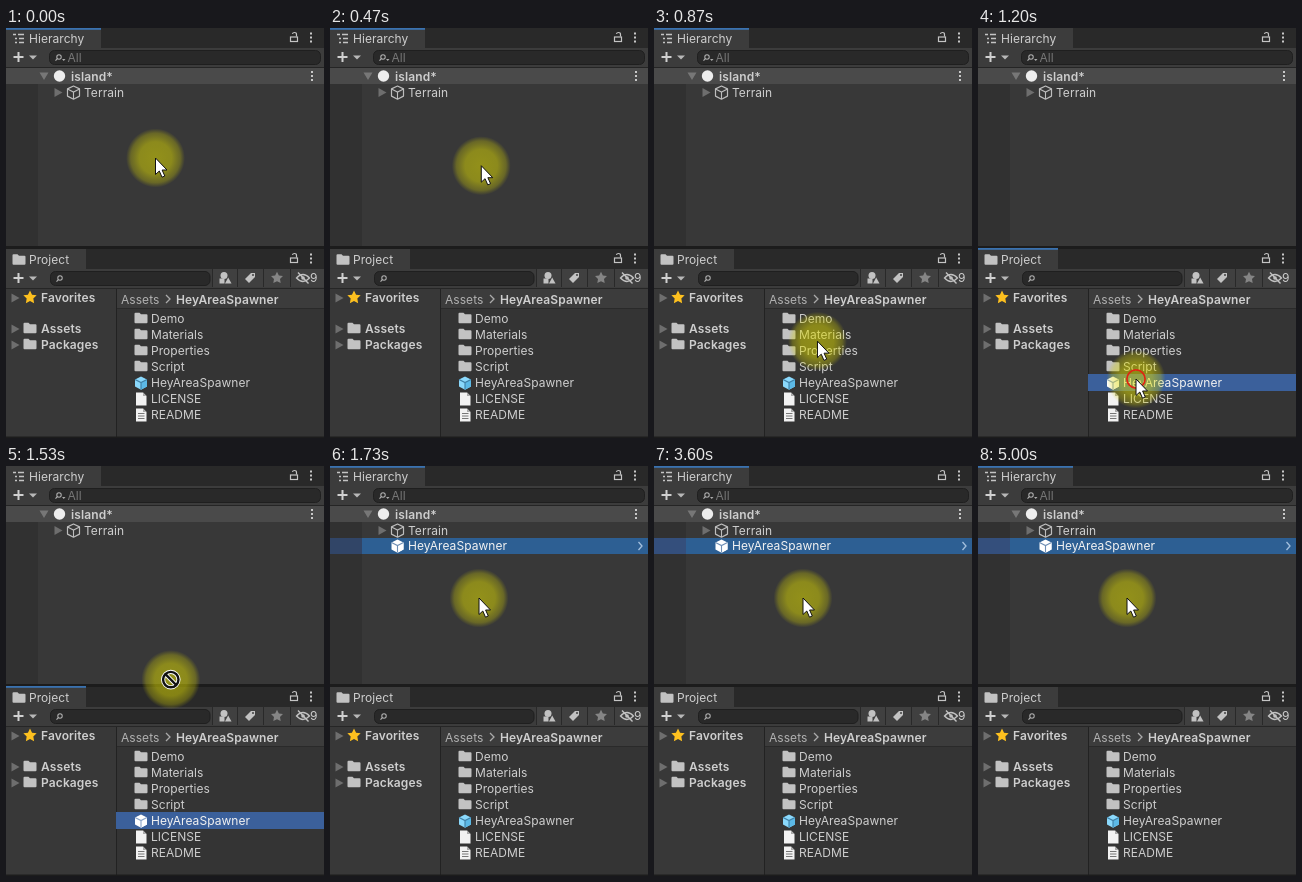
Animation of 318x410 px, one loop 5.07 s. Source, as an HTML page:

```html
<!DOCTYPE html>
<html lang="en">
<head>
<meta charset="utf-8">
<title>Editor panels</title>
<style>
html, body { margin: 0; width: 100%; height: 100%; overflow: hidden; background: #383838; }
svg { display: block; width: 318px; height: 410px; }
text { font: 12px Inter, "Liberation Sans", sans-serif; letter-spacing: .05px; fill: #cecece; }
.b { font-weight: 600; letter-spacing: .12px; }
</style>
</head>
<body>
<svg id="stage" viewBox="0 0 318 410">
  <defs>
    <radialGradient id="halo">
      <stop offset="0" stop-color="#e0dc00" stop-opacity=".54"/>
      <stop offset=".55" stop-color="#e0dc00" stop-opacity=".5"/>
      <stop offset=".84" stop-color="#d4d000" stop-opacity=".31"/>
      <stop offset="1" stop-color="#c8c400" stop-opacity="0"/>
    </radialGradient>
  </defs>
  <g id="ui"></g>
  <g id="pointer">
    <circle r="29.5" fill="url(#halo)"/>
    <circle id="ring" r="9" fill="none" stroke="#e02412" stroke-width="1.7"/>
    <path id="arrow" d="M0 0V16.5L3.8 13L6.5 19.2L9.3 18L6.6 12H11.5Z" fill="#fff" stroke="#111" stroke-width="1"/>
    <path id="resize" d="M0 -11L4.5 -6H1.5V6H4.5L0 11L-4.5 6H-1.5V-6H-4.5Z" fill="#fff" stroke="#111"/>
    <g id="deny" fill="none">
      <circle r="7.7" stroke="#fff" stroke-width="4.2"/>
      <path d="M-5.4 -5.4L5.4 5.4" stroke="#fff" stroke-width="4.2"/>
      <circle r="7.7" stroke="#111" stroke-width="2.4"/>
      <path d="M-5.4 -5.4L5.4 5.4" stroke="#111" stroke-width="2.4"/>
    </g>
  </g>
</svg>
<script>
const LOOP = 5070, STEP = 1000 / 15;
const PRESS = 1070, DRAG = 1350, DROP = 1730;
const $ = id => document.getElementById(id);

const rect = (x, y, w, h, fill, extra = "") =>
  `<rect x="${x}" y="${y}" width="${w}" height="${h}" fill="${fill}" ${extra}/>`;
const text = (x, y, s, extra = "") => `<text x="${x}" y="${y}" ${extra}>${s}</text>`;
const path = (d, fill, extra = "") => `<path d="${d}" fill="${fill}" ${extra}/>`;
const line = (d, color, w = 1, extra = "") =>
  path(d, "none", `stroke="${color}" stroke-width="${w}" ${extra}`);
const at = (x, y, s) => `<g transform="translate(${x} ${y})">${s}</g>`;
const bold = 'class="b"';

const star = (x, y, r, fill) => {
  let d = "";
  for (let i = 0; i < 10; i++) {
    const a = i * Math.PI / 5, q = i % 2 ? r * .5 : r;
    d += `${i ? "L" : "M"}${(x + q * Math.sin(a)).toFixed(2)} ${(y - q * Math.cos(a)).toFixed(2)}`;
  }
  return path(d + "Z", fill);
};
const folder = (x, y) => at(x, y,
  path("M-6.5 -4.3Q-6.5 -5.3 -5.5 -5.3H-1.5L0 -3.8H5.5Q6.5 -3.8 6.5 -2.8V4.3Q6.5 5.3 5.5 5.3H-5.5Q-6.5 5.3 -6.5 4.3Z", "#c2c2c2"));
const closed = (x, y) => path(`M${x - 3.5} ${y - 4.5}L${x + 4.5} ${y}L${x - 3.5} ${y + 4.5}Z`, "#6e6e6e");
const opened = (x, y) => path(`M${x - 4.5} ${y - 3.5}H${x + 4.5}L${x} ${y + 4}Z`, "#777");
const kebab = (x, y) => [-4, 0, 4].map(d => rect(x - 1, y + d - 1, 2, 2, "#c8c8c8")).join("");
const lock = (x, y) => at(x, y,
  rect(-3.5, -.5, 7, 4.5, "none", 'stroke="#c4c4c4" stroke-width="1.2"') +
  line("M2.5 -1V-3Q2.5 -5 .5 -5Q-1.2 -5 -1.6 -3.6", "#c4c4c4", 1.2));
const cube = (x, y, fill, edge, side = fill) => at(x, y,
  path("M0 -6.5L6 -3.6V3.6L0 6.7L-6 3.6V-3.6Z", fill) + path("M0 -.4L6 -3.4V3.6L0 6.7Z", side) +
  (fill === "none" ? line("M0 -6.5L6 -3.6V3.6L0 6.7L-6 3.6V-3.6Z", edge, 1.2, 'stroke-linejoin="round"') : "") +
  line("M-6 -3.4L0 -.4L6 -3.4M0 -.4V6.5", edge, 1.1));
const page = (x, y, lines) => at(x, y,
  path("M-5 -6.5H2L5.5 -3V6.5H-5Z", "#f2f2f2") + path("M2 -6.5V-3H5.5Z", "#aaa") +
  (lines ? line("M-3 -1.5H3.5M-3 1H3.5M-3 3.5H3.5", "#777") : ""));
const search = (x, y, w) =>
  rect(x, y, w, 14, "#292929", 'rx="5" stroke="#1f1f1f"') +
  at(x + 9.5, y + 7, '<circle cx="0" cy="-.5" r="2.2" fill="none" stroke="#b0b0b0" stroke-width="1.1"/>' +
    line("M-1.6 1.2L-3.5 3.2", "#b0b0b0", 1.2));
const addMenu = y => line(`M7.5 ${y}H17.5M12.5 ${y - 5}V${y + 5}`, "#d0d0d0", 2) +
  path(`M23 ${y - 1.5}H31L27 ${y + 2.5}Z`, "#b8b8b8");
const header = (y, id, label, tabWidth, icon) =>
  rect(0, y, 318, 20, "#292929") + rect(0, y, tabWidth, 20, "#3c3c3c") +
  rect(0, Math.max(0, y - 1), tabWidth, 1.8, "#3a72b0", `id="${id}"`) +
  icon + text(23, y + 15, label) + lock(288, y + 9.5) + kebab(305, y + 9.5) +
  rect(0, y + 20, 318, 19, "#3c3c3c") + addMenu(y + 29);

function hierarchy() {
  const tree = line("M7 6.5H10M12 6.5H18M9 10.5H11M13 10.5H18M9 14.5H11M13 14.5H18", "#c4c4c4", 1.4);
  return header(0, "focusTop", "Hierarchy", 95, tree) +
    search(43.5, 22.5, 271) + path("M56 31H59.5L57.7 33Z", "#aaa") +
    text(61.5, 34, "All", 'style="fill:#777"') +
    rect(0, 39, 318, 1, "#252525") + rect(0, 40, 32, 178, "#313131") +
    rect(0, 40, 318, 16, "#4a4a4a") + opened(38, 48) +
    '<circle cx="53.5" cy="48" r="5.7" fill="#ededed"/>' +
    text(65, 52.5, "island*", bold) + kebab(306, 48) +
    closed(52, 64.5) + cube(67.5, 64.5, "none", "#bdbdbd") + text(78, 69, "Terrain") +
    `<g id="spawned">${rect(0, 72, 32, 16, "#344f7c", 'id="gutter"')}${rect(32, 72, 286, 16, "#2d5f93")}` +
    cube(67.5, 80, "#fff", "#6f8fb5") + text(78, 84, "HeyAreaSpawner", 'style="fill:#f2f2f2"') +
    line("M308.5 76L312 80L308.5 84", "#a3bfdd", 1.3) + "</g>";
}

function toolbarIcons() {
  const grey = "#c2c2c2";
  return rect(207, 241, 111, 18, "#404040") +
    line("M206.5 241V259M231.5 241V259M257.5 241V259M284.5 241V259", "#292929") +
    at(219, 250, '<circle cx="-1" cy="-2.5" r="3.5" fill="#c2c2c2"/>' +
      path("M0 5.5L3.2 -.5L6.5 5.5Z", grey) + rect(-5.5, .5, 5, 5, grey)) +
    at(244, 250, path("M-5 1L1 -5H5V-1L-1 5Z", grey) + '<circle cx="3" cy="-3" r="1" fill="#404040"/>') +
    star(271, 250, 6.3, "#858585") +
    at(297, 250, line("M-6.5 0Q0 -7 6.5 0Q0 7 -6.5 0Z", grey, 1.3) +
      '<circle r="1.8" fill="#c2c2c2"/>' + line("M-5 -5.5L5.5 5.5", grey, 1.4)) +
    text(304, 254, "9");
}

function project() {
  const files = ["Demo", "Materials", "Properties", "Script", "HeyAreaSpawner", "LICENSE", "README"];
  const rows = files.map((name, i) => {
    const y = 291 + 16 * i;
    const icon = i < 4 ? folder(135, y - 1) : i > 4 ? page(135, y, i === 6)
      : `<g id="blueCube">${cube(135, y, "#8ad8fb", "#3f7fa5", "#5cb9e6")}</g><g id="whiteCube">${cube(135, y, "#fff", "#8ba4c8")}</g>`;
    return icon + text(145, y + 4, name, i === 4 ? 'id="asset"' : "");
  }).join("");
  return rect(0, 218, 318, 3, "#1c1c1c") +
    header(221, "focusLow", "Project", 80, at(13, 231.5, folder(0, 0))) +
    search(44.5, 243.5, 159.5) + toolbarIcons() +
    rect(0, 260, 318, 1, "#262626") + rect(0, 261, 110, 148, "#383838") +
    rect(111, 261, 207, 148, "#343434") + rect(111, 261, 207, 19, "#3c3c3c") +
    rect(111, 280, 207, 1, "#2a2a2a") + rect(110, 261, 1, 148, "#222") +
    closed(9, 270) + star(24, 269.5, 7, "#fdc01f") + text(35, 274, "Favorites", bold) +
    closed(9, 301) + folder(24, 300) + text(35, 305, "Assets", bold) +
    closed(9, 317) + folder(24, 316) + text(35, 321, "Packages", bold) +
    text(115, 275.5, "Assets", 'style="fill:#b2b2b2"') + line("M160 267L164 271L160 275", "#aaa", 1.3) +
    text(170, 275.5, "HeyAreaSpawner", bold) +
    rect(110, 346, 208, 17, "#3b609b", 'id="picked"') + rows +
    rect(0, 408.5, 318, 1.5, "#1c1c1c");
}

$("ui").innerHTML = rect(0, 0, 318, 410, "#383838") + hierarchy() + project();

const show = (id, on) => $(id).style.display = on ? "" : "none";
const ease = (t, a, b) => {
  const s = Math.min(1, Math.max(0, (t - a) / (b - a)));
  return s * s * (3 - 2 * s);
};

// Both trips bow out to the right
function position(t) {
  const down = t < DRAG;
  const s = down ? ease(t, 395, 1035) : ease(t, DRAG, 1663);
  const [x0, y0, x1, y1] = down ? [149.5, 130, 158, 351] : [158, 351, 149, 132];
  return [x0 + (x1 - x0) * s + 13.5 * Math.sin(Math.PI * s), y0 + (y1 - y0) * s];
}

function draw(now) {
  const t = Math.floor((now % LOOP + 5) / STEP) * STEP;
  const [x, y] = position(t);
  const picked = t > PRESS - 10 && t < DROP;
  const dropped = t >= DROP;
  const edge = y > 205 && y < 232;
  const dragging = t >= DRAG && !dropped;
  show("focusTop", !picked);
  show("focusLow", picked);
  show("picked", picked);
  show("blueCube", !picked);
  show("whiteCube", picked);
  $("asset").style.fill = picked ? "#f2f2f2" : "";
  show("spawned", dropped);
  $("gutter").setAttribute("fill", t < 2395 ? "#314567" : "#344f7c");
  $("pointer").setAttribute("transform", `translate(${x.toFixed(2)} ${y.toFixed(2)})`);
  show("resize", edge && !dragging);
  show("deny", edge && dragging);
  show("arrow", !edge);
  const k = (t - PRESS) / 280;
  show("ring", k > -.05 && k < 1);
  $("ring").setAttribute("r", Math.max(3, 4 + 11 * k).toFixed(2));
}

const start = performance.now();
function tick() {
  draw(performance.now() - start);
  requestAnimationFrame(tick);
}
draw(0);
tick();
</script>
</body>
</html>
```
